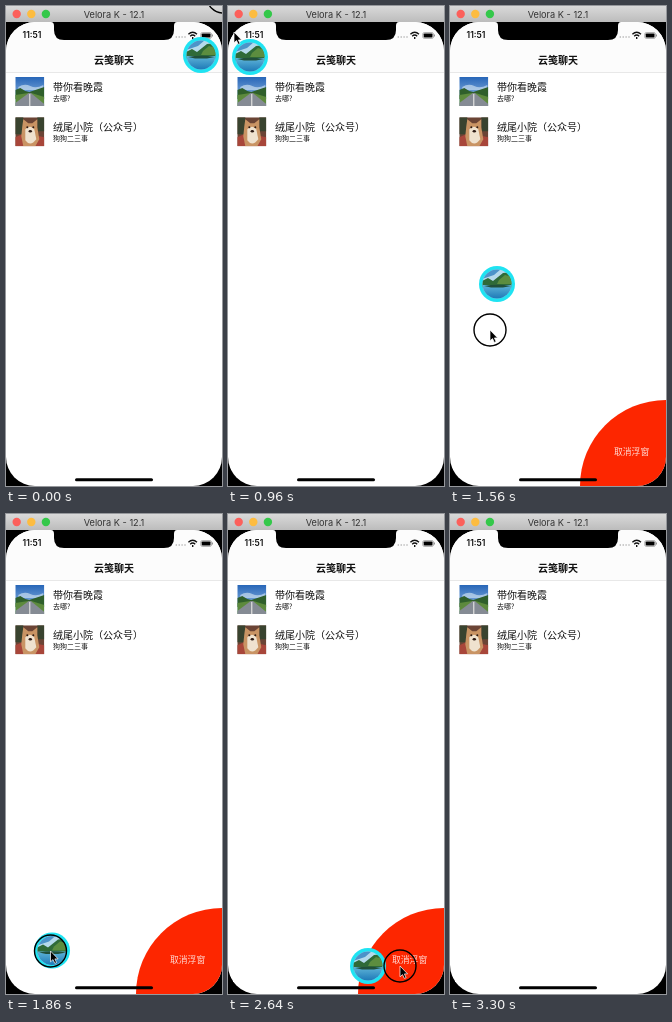
An HTML page that plays this animation: 216x480 px, repeating every 3360 ms.

```html
<!DOCTYPE html>
<html lang="zh-CN">
<head>
<meta charset="utf-8">
<title>悬浮球</title>
<style>
  html, body { margin: 0; width: 100%; height: 100%; overflow: hidden; background: #000; }
  svg { display: block; width: 100vw; height: 100vh; }
  text { font-family: "Noto Sans CJK SC", "Noto Sans CJK", sans-serif; font-size: 10px; fill: #111; }
  .latin { font-family: Inter, Roboto, sans-serif; }
  .small { font-size: 7px; }
  .mid { text-anchor: middle; }
</style>
</head>
<body>
<svg viewBox="0 0 216 480" preserveAspectRatio="none">
  <defs>
    <linearGradient id="bar" x2="0" y2="1">
      <stop stop-color="#d9d9d9"/><stop offset="1" stop-color="#bcbcbc"/>
    </linearGradient>
    <linearGradient id="sky" x2="0" y2="1">
      <stop stop-color="#2866b8"/><stop offset="1" stop-color="#a9cdec"/>
    </linearGradient>
    <linearGradient id="lake" x2="0" y2="1">
      <stop stop-color="#5fb4d8"/><stop offset="1" stop-color="#1673b4"/>
    </linearGradient>
    <clipPath id="screen"><rect y="16" width="216" height="464" rx="29"/></clipPath>
    <clipPath id="disc"><circle r="14.5"/></clipPath>
    <clipPath id="thumb"><rect width="29" height="29"/></clipPath>
  </defs>

  <rect width="216" height="480"/>
  <g clip-path="url(#screen)">
    <rect y="16" width="216" height="464" fill="#fff"/>
    <rect y="16" width="216" height="50" fill="#fcfcfc"/>
    <path d="M0 66.5H216" stroke="#dedede" stroke-width=".7"/>
    <text class="mid" x="108" y="57.7" font-weight="600">云笺聊天</text>

    <g transform="translate(9.3 71)" clip-path="url(#thumb)">
      <rect width="29" height="29" fill="url(#sky)"/>
      <path d="M3 10Q9 6 15 9T28 8V13H3Z" fill="#dcebf6" opacity=".6"/>
      <path d="M0 13L5 11L10 14L14 15L20 13L29 10V22H0Z" fill="#2f5f2b"/>
      <path d="M0 18L13 16H16L29 20V29H0Z" fill="#5d8a3d"/>
      <path d="M13.5 16H15.5L29 27V29H0V26Z" fill="#858b94"/>
      <path d="M14.5 17V29" stroke="#f2f2ee" stroke-width="1"/>
    </g>
    <text x="47" y="84.6">带你看晚霞</text>
    <text class="small" x="47" y="94.7">去哪?</text>

    <g transform="translate(9.3 111.3)" clip-path="url(#thumb)">
      <rect width="29" height="29" fill="#6b4435"/>
      <path d="M0 0H8V17H0ZM22 0H29V14H22Z" fill="#39432f"/>
      <path d="M0 20L9 16L29 20V29H0Z" fill="#a8463a"/>
      <path d="M7 9L8 2L13 6H17L22 2L22 10L24 22L20 29H8L6 19Z" fill="#c99464"/>
      <path d="M10 12Q15 7 19 12L21 22Q15 30 10 23Z" fill="#efe2cf"/>
      <circle cx="12" cy="10" r="1" fill="#2b1a14"/><circle cx="18" cy="10" r="1" fill="#2b1a14"/>
      <ellipse cx="15" cy="14" rx="1.7" ry="1.3" fill="#2b1a14"/>
    </g>
    <text x="47" y="124.6">绒尾小院（公众号）</text>
    <text class="small" x="47" y="134.7">狗狗二三事</text>

    <text class="latin" x="16.5" y="32.3" font-size="9" style="font-size:8.6px" font-weight="600">11:51</text>
    <g fill="#aaa">
      <circle cx="170.3" cy="31" r=".8"/><circle cx="173.2" cy="31" r=".8"/>
      <circle cx="176.1" cy="31" r=".8"/><circle cx="179" cy="31" r=".8"/>
    </g>
    <g fill="none" stroke="#111" stroke-width="1.4">
      <path d="M182.4 28.2Q186.7 24.4 191 28.2M184.2 30.2Q186.7 28 189.2 30.2"/>
      <path d="M186.7 31V33"/>
    </g>
    <rect x="194.8" y="26.6" width="10.6" height="5.8" rx="1.5" fill="none" stroke="#777" stroke-width=".6"/>
    <rect x="195.7" y="27.5" width="8.8" height="4" rx=".8"/>
    <path d="M206.5 28.5V30.5" stroke="#777" stroke-width=".8"/>

    <g id="zone">
      <circle id="zoneDisc" cx="216" cy="480" r="86" fill="#fd2600"/>
      <text x="164" y="449.3" style="font-size:8.8px;fill:#ffd9d2">取消浮窗</text>
    </g>

    <g id="ball">
      <circle r="18" fill="#1fe3f2"/>
      <g clip-path="url(#disc)">
        <rect x="-15" y="-15" width="30" height="30" fill="#b5d9ec"/>
        <path d="M-15 -15H4L-3 -9L-15 -5Z" fill="#4c93c9"/>
        <path d="M-15 -3L-9 -6L-4 -3L1 -7L6 -11L15 -12V4H-15Z" fill="#2f6a38"/>
        <path d="M2 -4L8 -9L15 -7V0H0Z" fill="#5c8d3f"/>
        <rect x="-15" y="1" width="30" height="15" fill="url(#lake)"/>
        <path d="M-13 2Q0 -.5 14 2L6 3.5H-6Z" fill="#214f3a"/>
      </g>
    </g>
    <rect x="69" y="472.3" width="78" height="3" rx="1.5" fill="#000"/>
  </g>

  <path d="M45 16H171Q168 16 168 20V24Q168 34 158 34H58Q48 34 48 24V20Q48 16 45 16Z"/>
  <rect width="216" height="16" fill="url(#bar)"/>
  <circle cx="10.7" cy="8" r="4.2" fill="#fc605b"/>
  <circle cx="25.3" cy="8" r="4.2" fill="#fdbc40"/>
  <circle cx="39.9" cy="8" r="4.2" fill="#34c84a"/>
  <text class="latin mid" x="108" y="11.5" style="font-size:9.2px;fill:#333">Velora K - 12.1</text>

  <g id="pointer">
    <circle id="press" r="16" fill="none" stroke="#000" stroke-width="1.4"/>
    <path d="M0 0V10.8L2.5 8.6L4.3 12.4L6.1 11.6L4.4 7.9H7.6Z" stroke="#fff" stroke-width=".7"/>
  </g>
</svg>
<script>
const LOOP = 3360, STEP = 60;
const $ = id => document.getElementById(id);
const zone = $("zone"), zoneDisc = $("zoneDisc"), ball = $("ball");
const pointer = $("pointer"), press = $("press");

// Keys are [ms, ...values].
const ballKeys = [
  [0, 195, 49], [180, 195, 49], [600, 77, 60], [720, 50, 52], [900, 22, 51],
  [1200, 22, 51], [1560, 47, 278], [1800, 46, 430], [1920, 46, 443],
  [2100, 23, 443], [2400, 23, 443], [2640, 140, 452], [2820, 178, 460]
];
const pointerKeys = [
  [0, 217, -9], [120, 200, 45], [600, 67, 69], [720, 40, 42], [960, 6, 26],
  [1140, 20, 48], [1560, 40, 324], [1800, 45, 436], [1920, 44, 438],
  [2280, 24, 436], [2400, 85, 424], [2640, 172, 452], [2880, 188, 456], [3180, 232, 470]
];
const zoneKeys = [
  [240, 0], [480, 1], [720, 1], [900, 0], [1200, 0], [1440, 1],
  [1920, 1], [2100, 0], [2460, 0], [2640, 1], [2880, 1], [3120, 0]
];
const presses = [[0, 720], [1140, 1920], [2280, 2820]];

function sample(keys, t) {
  const i = keys.findIndex(k => k[0] > t);
  if (i === 0) return keys[0].slice(1);
  if (i < 0) return keys[keys.length - 1].slice(1);
  const a = keys[i - 1], b = keys[i];
  const p = (t - a[0]) / (b[0] - a[0]);
  return a.slice(1).map((v, n) => v + (b[n + 1] - v) * p);
}

const move = (el, x, y) => el.setAttribute("transform", `translate(${x} ${y})`);
const show = (el, on) => el.setAttribute("visibility", on ? "visible" : "hidden");

function draw(t) {
  move(ball, ...sample(ballKeys, t));
  show(ball, t < 2940);
  move(pointer, ...sample(pointerKeys, t));
  show(press, presses.some(([from, to]) => t >= from && t < to));
  const [shown] = sample(zoneKeys, t);
  const shift = (1 - shown) * 97;
  move(zone, shift, shift);
  zoneDisc.setAttribute("r", t >= 2700 && t < 3180 ? 95 : 86);
}

const start = performance.now();
function tick() {
  const t = (performance.now() - start) % LOOP;
  draw(Math.floor(t / STEP) * STEP);
  requestAnimationFrame(tick);
}
draw(0);
requestAnimationFrame(tick);
</script>
</body>
</html>
```
